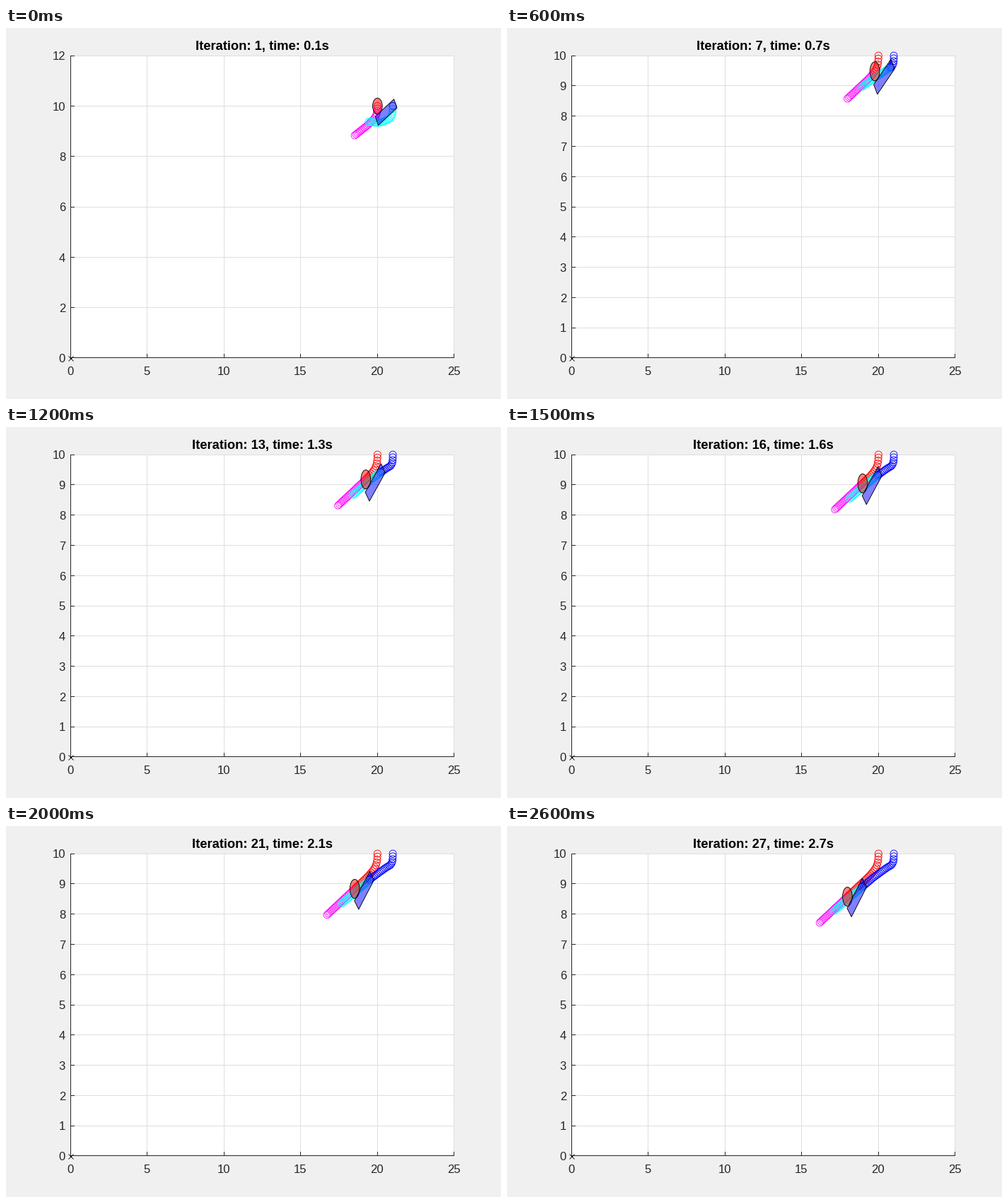
A matplotlib script that plays this animation: 700 by 525 pixels, repeating every 2700 ms.

```python
import numpy as np
import matplotlib.pyplot as plt
from matplotlib.animation import FuncAnimation
from matplotlib.patches import Ellipse, Polygon

W, H, DPI = 700, 525, 100
PX = 72 / DPI                      # points per pixel
LEFT, RIGHT, TOP, BOTTOM = 91.3, 633.8, 39.1, 466.95
X_MAX = 25
TICK = 5.4
FRAMES, HORIZON = 27, 20
DARK = (38 / 255,) * 3
GRID = (222 / 255,) * 3
FONT = "Liberation Sans"
RADIUS = 0.315
LENGTH_BACK, LENGTH_FRONT, HALF_WIDTH = 0.2, 1.2, 0.2

fig = plt.figure(figsize=(W / DPI, H / DPI), dpi=DPI, facecolor=(240 / 255,) * 3)
ax = fig.add_axes([0, 0, 1, 1])
ax.set_xlim(0, W)
ax.set_ylim(H, 0)
ax.axis("off")
ax.set_autoscale_on(False)


def to_px(points, y_max):
    """Data coordinates to stage pixels."""
    x, y = np.asarray(points, float).T
    return np.column_stack([LEFT + x / X_MAX * (RIGHT - LEFT),
                            BOTTOM - y / y_max * (BOTTOM - TOP)])


def walk(start, steps):
    return np.vstack([start, start - np.cumsum(steps, axis=0)])


def leader_path(n):
    # headings measured from straight down, turning towards the origin
    turn = np.full(n, 64.5)
    turn[:12] = [3, 8, 17, 30, 42, 50, 55, 58, 60, 61, 62, 63]
    a = np.radians(turn)
    return walk(np.array([20.0, 10.0]), 0.1 * np.column_stack([np.sin(a), np.cos(a)]))


def follower_path(n):
    steps = np.tile([0.0915, 0.0395], (n, 1))
    steps[:8] = [(0, .09), (.01, .09), (.025, .08), (.045, .06),
                 (.07, .05), (.08, .03), (.085, .025), (.09, .025)]
    steps[8:12] = .0925, .033
    steps[12:18] = .091, .034
    return walk(np.array([21.0, 10.0]), steps)


leader = leader_path(FRAMES + HORIZON)
follower = follower_path(FRAMES + HORIZON)


def follower_forecast(i):
    """Planned path; the early plans swing low and end too high."""
    n = i + 1
    u = np.arange(1, HORIZON + 1) / HORIZON
    lift = 0.25 / (1 + (n / 6) ** 6)
    dip = 0.17 * np.exp(-(n - 1) / 1.2)
    plan = follower[i + 1:i + 1 + HORIZON].copy()
    plan[:, 0] -= 0.28 * lift * u
    plan[:, 1] += lift * u ** 2 - dip * np.sin(np.pi * u)
    return plan


def body(i):
    a = np.radians(180 + np.interp(i + 1, [1, 5, 9, 13, 19, 27],
                                   [29.5, 33.5, 40, 42.5, 44, 45]))
    d = np.array([np.cos(a), np.sin(a)])
    side = HALF_WIDTH * np.array([-d[1], d[0]])
    back, front = follower[i] - LENGTH_BACK * d, follower[i] + LENGTH_FRONT * d
    return [back + side, back - side, front - side, front + side]


def line(x, y, color, z):
    # the half-pixel shift makes snapping pick the pixel that holds the point
    return ax.plot(np.array(x) - 0.5, np.array(y) - 0.5, color=color, lw=PX, zorder=z,
                   solid_capstyle="projecting")[0]


def label(x, y, text, ha):
    return ax.text(x, y, text, family=FONT, size=16.67 * PX, color=DARK, ha=ha, va="baseline")


def y_scale(y_max, step):
    parts = []
    for v in range(0, y_max + 1, step):
        y = to_px([(0, v)], y_max)[0, 1]
        parts += [line([LEFT, RIGHT], [y, y], GRID, 1),
                  line([LEFT, LEFT + TICK], [y, y], DARK, 2),
                  label(84, y + 6.3, str(v), "right")]
    return parts


def markers(color, z):
    return ax.scatter([], [], s=(10 * PX) ** 2, facecolors="none", edgecolors=[color],
                      linewidths=0.85 * PX, zorder=z, clip_on=False)


ax.add_patch(plt.Rectangle((LEFT, TOP), RIGHT - LEFT, BOTTOM - TOP, fc="white", ec="none", zorder=0))
for v in range(0, X_MAX + 1, 5):
    x = to_px([(v, 0)], 1)[0, 0]
    line([x, x], [TOP, BOTTOM], GRID, 1)
    line([x, x], [BOTTOM - TICK, BOTTOM], DARK, 2)
    label(x - 0.5, 491, str(v), "center")
scales = {12: y_scale(12, 2), 10: y_scale(10, 1)}
line([LEFT, LEFT], [TOP, BOTTOM], DARK, 3)
line([LEFT, RIGHT], [BOTTOM, BOTTOM], DARK, 3)
ax.plot([LEFT], [BOTTOM], "x", color="black", ms=7 * PX, mew=0.85 * PX, zorder=4)

title = ax.text((LEFT + RIGHT) / 2 + 0.2, 31, "", family=FONT, weight="bold",
                size=18.33 * PX, color="black", ha="center", va="baseline")
red, blue = markers((1, 0, 0), 5), markers((0, 0, 1), 6)
magenta, cyan = markers((1, 0, 1), 7), markers((0, 1, 1), 8)
disc = ax.add_patch(Ellipse((0, 0), 1, 1, fc=(1, 0, 0, 0.5), ec="black", lw=0.9 * PX, zorder=9))
box = ax.add_patch(Polygon([(0, 0), (1, 0), (1, 1)], closed=True, fc=(0, 0, 1, 0.5),
                           ec="black", lw=0.9 * PX, joinstyle="miter", zorder=10))


def update(i):
    y_max = 12 if i < 5 else 10
    for key, parts in scales.items():
        for part in parts:
            part.set_visible(key == y_max)
    title.set_text(f"Iteration: {i + 1}, time: {(i + 1) / 10:.1f}s")
    for artist, points in ((red, leader[:i + 1]), (blue, follower[:i + 1]),
                           (magenta, leader[i + 1:i + 1 + HORIZON]),
                           (cyan, follower_forecast(i))):
        artist.set_offsets(to_px(points, y_max))
    disc.set_center(to_px([leader[i]], y_max)[0])
    disc.set_width(2 * RADIUS * (RIGHT - LEFT) / X_MAX)
    disc.set_height(2 * RADIUS * (BOTTOM - TOP) / y_max)
    box.set_xy(to_px(body(i), y_max))
    return []


anim = FuncAnimation(fig, update, frames=FRAMES, interval=100, repeat=True)
plt.show()
```
